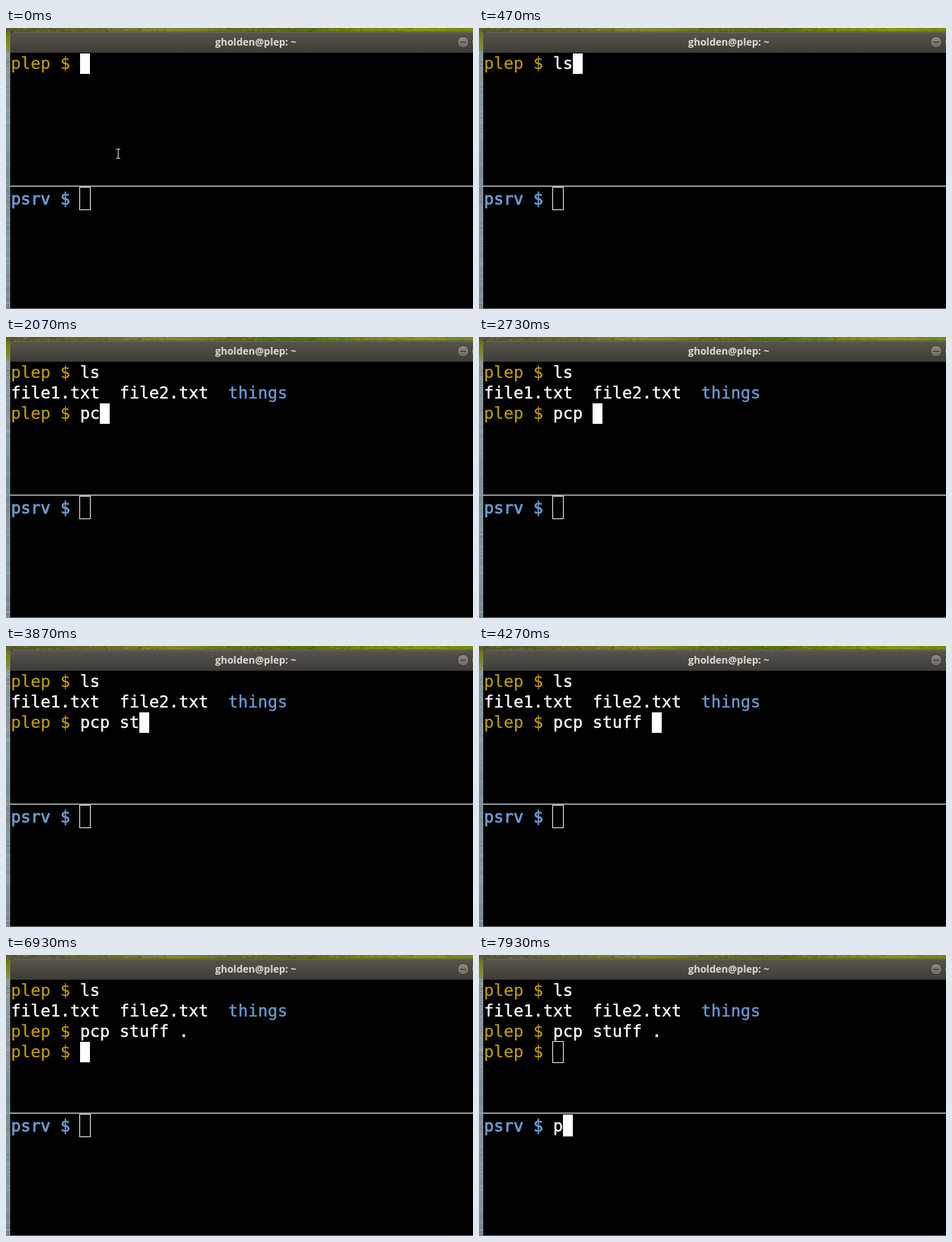
These frames come from a looping animation (662 px wide and 398 px high, 8 s). An HTML page with a canvas:

```html
<!DOCTYPE html>
<html lang="en">
<head>
<meta charset="utf-8">
<title>Terminal</title>
<style>
  html, body { margin: 0; width: 100%; height: 100%; overflow: hidden; background: #000; }
  canvas { display: block; width: 662px; height: 398px; }
</style>
</head>
<body>
<canvas id="stage" width="662" height="398"></canvas>
<script>
const W = 662, H = 398, LOOP = 8000;
const CELL = 14, ROW = 29, LEFT = 7, TOP = 36, LOWER = 226, LOWER_H = 31;
const MONO = '23.254px "DejaVu Sans Mono", "Noto Sans Mono", monospace';
const YELLOW = '#c4a000', BLUE = '#6f9bd0', WHITE = '#fff';
const ctx = document.getElementById('stage').getContext('2d');

// Stages of the session
const LS = 0, LISTING = 1, COPY = 2, RUNNING = 3, DONE = 4, SERVER = 5;

// [start ms, stage, typed text, cursor visible]
const steps = [
  [0, LS, '', true],
  [200, LS, 'l', true],
  [400, LS, 'ls', true],
  [800, LISTING, '', false],
  [870, COPY, '', true],
  [1400, COPY, '', false],
  [1870, COPY, 'p', true],
  [2000, COPY, 'pc', true],
  [2130, COPY, 'pcp', true],
  [2730, COPY, 'pcp ', true],
  [3270, COPY, 'pcp ', false],
  [3670, COPY, 'pcp s', true],
  [3870, COPY, 'pcp st', true],
  [3930, COPY, 'pcp stu', true],
  [4070, COPY, 'pcp stuf', true],
  [4200, COPY, 'pcp stuff', true],
  [4270, COPY, 'pcp stuff ', true],
  [4870, COPY, 'pcp stuff ', false],
  [5470, COPY, 'pcp stuff .', true],
  [5730, RUNNING, '', true],
  [5870, RUNNING, '', false],
  [5930, DONE, '', true],
  [6330, DONE, '', false],
  [6930, DONE, '', true],
  [7200, SERVER, '', true],
  [7800, SERVER, '', false],
  [7930, SERVER, 'p', true]
];

function box(g, color, x, y, w, h) {
  g.fillStyle = color;
  g.fillRect(x, y, w, h);
}

function gradient(g, x0, y0, x1, y1, colors) {
  const fill = g.createLinearGradient(x0, y0, x1, y1);
  colors.forEach((c, i) => fill.addColorStop(i / (colors.length - 1), c));
  return fill;
}

function random(seed) {
  return () => (seed = (seed * 16807) % 2147483647) / 2147483647;
}

function button(g, x) {
  g.beginPath();
  g.arc(x, 20, 8, 0, Math.PI * 2);
  g.fillStyle = gradient(g, 0, 12, 0, 28, ['#8c8a82', '#6d6b64']);
  g.fill();
  g.strokeStyle = '#33322e';
  g.lineWidth = 1;
  g.stroke();
}

function makeBackdrop() {
  const layer = document.createElement('canvas');
  layer.width = W;
  layer.height = H;
  const g = layer.getContext('2d');
  const rnd = random(41);

  // Desktop: grass above, stone at the left
  box(g, gradient(g, 0, 30, 0, H, ['#8b9799', '#8d9aa2', '#7f8d97', '#8b98a1', '#7c8993']), 0, 0, 7, H);
  for (let i = 0; i < 130; i++) {
    box(g, rnd() < 0.5 ? 'rgba(60,72,82,.12)' : 'rgba(205,215,220,.12)', 0, 36 + rnd() * 360, 6, 1.5);
  }
  box(g, gradient(g, 0, 0, 0, 34, ['#5a5f20', '#737d1c', '#7d8728', '#84906a']), 0, 0, 7, 34);
  box(g, gradient(g, 0, 0, W, 0,
    ['#55582a', '#5c5c2a', '#73742d', '#858a28', '#5d6a17', '#59690f', '#71840d', '#849812', '#75890f']), 0, 0, W, 5);
  for (let i = 0; i < 420; i++) {
    box(g, rnd() < 0.5 ? 'rgba(45,50,10,.22)' : 'rgba(195,195,80,.18)', rnd() * W, rnd() * 5, 1 + rnd() * 3, 1.3);
  }

  // Window
  g.beginPath();
  g.moveTo(6, 35);
  g.lineTo(6, 11);
  g.quadraticCurveTo(6, 5, 12, 5);
  g.lineTo(W, 5);
  g.lineTo(W, 35);
  g.fillStyle = gradient(g, 0, 5, 0, 35, ['#57554c', '#4a4942', '#3d3c37']);
  g.fill();
  box(g, '#6a685f', 11, 6, W, 1);
  box(g, '#000', 6, 35, W, H - 36);
  box(g, '#66706d', 6, H - 1, W, 1);

  g.font = 'bold 14px "Open Sans", "Noto Sans", sans-serif';
  g.textAlign = 'center';
  g.fillStyle = '#dfdbd2';
  g.fillText('gholden@plep: ~', 354, 25);

  button(g, 648);
  button(g, 668);
  box(g, '#3c3b37', 644, 19.5, 8, 1.5);

  box(g, '#8c9c9c', 6, 223, W, 2);
  return layer;
}

// A thin outline gives the face its medium weight
function write(text, col, y, color, outline = 0.4) {
  const x = LEFT + col * CELL;
  ctx.font = MONO;
  ctx.fillStyle = ctx.strokeStyle = color;
  ctx.lineWidth = outline;
  ctx.lineJoin = 'round';
  ctx.fillText(text, x, y);
  ctx.strokeText(text, x, y);
}

function line(row, typed) {
  const y = TOP + row * ROW + 22;
  write('plep $', 0, y, YELLOW, 0.2);
  write(typed, 7, y, WHITE);
}

function hollow(y, h) {
  ctx.strokeStyle = WHITE;
  ctx.lineWidth = 1;
  ctx.lineJoin = 'miter';
  ctx.strokeRect(104.5, y - 0.5, CELL + 1, h + 1);
}

function pointer() {
  box(ctx, '#d8d8d8', 158.5, 172, 1.2, 12);
  box(ctx, '#d8d8d8', 156, 171, 6, 1);
  box(ctx, '#d8d8d8', 156, 184, 6, 1);
}

const backdrop = makeBackdrop();

function draw([start, stage, typed, cursor]) {
  ctx.drawImage(backdrop, 0, 0);
  line(0, stage === LS ? typed : 'ls');
  if (stage >= LISTING) {
    write('file1.txt  file2.txt', 0, TOP + ROW + 22, WHITE);
    write('things', 22, TOP + ROW + 22, BLUE);
  }
  if (stage >= COPY) line(2, stage === COPY ? typed : 'pcp stuff .');
  if (stage >= DONE) line(3, '');

  write('psrv $', 0, LOWER + 24, BLUE, 0.8);
  const lower = stage === SERVER;
  if (lower) {
    write(typed, 7, LOWER + 24, WHITE);
    hollow(TOP + 3 * ROW, ROW);
  } else {
    hollow(LOWER, LOWER_H);
  }

  if (cursor) {
    const col = stage === RUNNING ? 0 : 7 + typed.length;
    const row = stage === LS ? 0 : stage === COPY ? 2 : 3;
    box(ctx, WHITE, LEFT + col * CELL, lower ? LOWER : TOP + row * ROW, CELL, lower ? LOWER_H : ROW);
  }
  if (start < 200) pointer();
}

let shown = null;
function tick() {
  const t = performance.now() % LOOP;
  let step = steps[0];
  for (const s of steps) if (s[0] <= t) step = s;
  if (step !== shown) draw(shown = step);
  requestAnimationFrame(tick);
}
tick();
</script>
</body>
</html>
```
